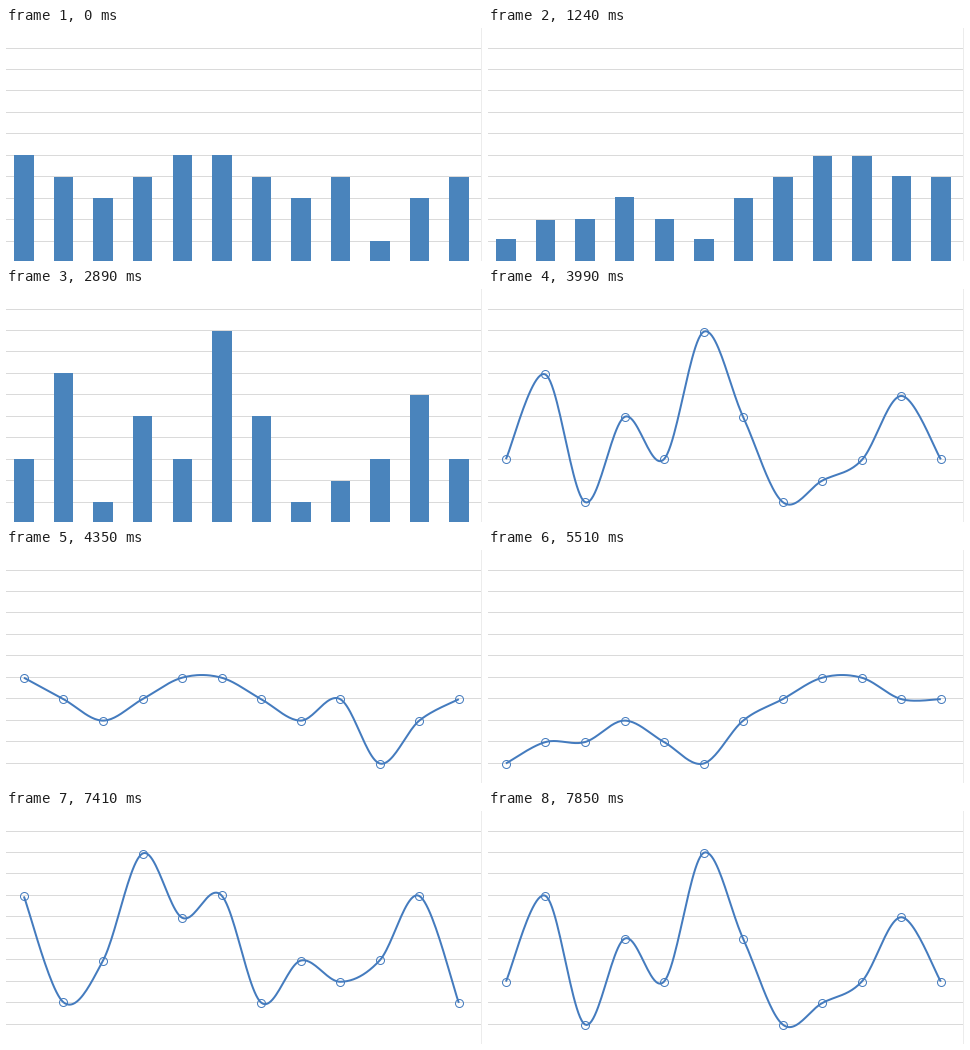
Write a matplotlib script that moves like this. It is 476 px wide and 233 px high and loops after 8.07 s.

```python
import numpy as np
import matplotlib.pyplot as plt
from matplotlib.animation import FuncAnimation
from matplotlib.patches import Rectangle

W, H, DPI = 476, 233, 100
LOOP, INTERVAL = 8070, 30
STEP = 40
SAMPLE = 20          # moment inside each frame that is drawn
LINE_START = 3150    # bars give way to the line chart

BAR, LINE, GRID, EDGE = "#4a84bc", "#447bbe", "#dadada", "#ececec"

A = np.array([5, 4, 3, 4, 5, 5, 4, 3, 4, 1, 3, 4], float)
B = np.array([1, 2, 2, 3, 2, 1, 3, 4, 5, 5, 4, 4], float)
C = np.array([7, 2, 4, 9, 6, 7, 2, 4, 3, 4, 7, 2], float)
D = np.array([3, 7, 1, 5, 3, 9, 5, 1, 2, 3, 6, 3], float)

# start time, number of steps, values before and after
MOVES = [
    (40, 9, A, B), (1240, 9, B, C), (2490, 11, C, D),
    (3990, 10, D, A), (5150, 10, A, B), (6260, 11, B, C), (7410, 12, C, D),
]

COUNT = len(A)
LEFTS = np.round(8.35 + 39.55 * np.arange(COUNT))
RIGHTS = np.round(27.75 + 39.55 * np.arange(COUNT))
XS = 17.9 + 39.54 * np.arange(COUNT)


def level(v):
    return 213.1 - 21.45 * (v - 1)


def ease(u):
    return 2 * u * u if u < 0.5 else 1 - 2 * (1 - u) ** 2


def values_at(t):
    vals = A
    for start, steps, old, new in MOVES:
        if t < start:
            break
        i = min((t - start) // STEP + 1, steps)
        vals = old + (new - old) * ease((i - 0.3) / (steps - 0.3))
    return vals


def smooth(p, n=24):
    """Cardinal spline through p, with gentler tangents at both ends."""
    m = np.gradient(p)
    m[[0, -1]] *= 0.5
    t = np.linspace(0, 1, n, endpoint=False)[:, None]
    h10, h01, h11 = t * (1 - t) ** 2, t * t * (3 - 2 * t), t * t * (t - 1)
    seg = (1 - h01) * p[:-1] + h10 * m[:-1] + h01 * p[1:] + h11 * m[1:]
    return np.append(seg.T.ravel(), p[-1])


def px(n):
    return n * 72 / DPI


fig = plt.figure(figsize=(W / DPI, H / DPI), dpi=DPI, facecolor="white")
ax = fig.add_axes([0, 0, 1, 1])
ax.set_xlim(0, W)
ax.set_ylim(H, 0)
ax.axis("off")


def block(x, y, w, h, color, z):
    return ax.add_patch(Rectangle((x, y), w, h, fc=color, lw=0,
                                  antialiased=False, zorder=z))


for v in range(1, 11):
    block(0, np.floor(level(v)), W - 1, 1, GRID, 1)
block(W - 1, 0, 1, H, EDGE, 1)

bars = [block(l, H, r - l, 0, BAR, 2) for l, r in zip(LEFTS, RIGHTS)]
curve_x = smooth(XS)
curve, = ax.plot([], [], color=LINE, lw=px(2), solid_joinstyle="round",
                 solid_capstyle="butt", zorder=3)
dots, = ax.plot([], [], "o", ms=px(8), mfc="none", mec=LINE, mew=px(1),
                zorder=4)


def draw(frame):
    t = frame * INTERVAL + SAMPLE
    vals = values_at(t)
    as_line = t >= LINE_START
    for bar, top in zip(bars, np.round(level(vals))):
        bar.set_visible(not as_line)
        bar.set_y(top)
        bar.set_height(H - top)
    ys = level(vals) + 0.4
    curve.set_data(curve_x, smooth(ys))
    dots.set_data(XS, ys)
    curve.set_visible(as_line)
    dots.set_visible(as_line)
    return [*bars, curve, dots]


anim = FuncAnimation(fig, draw, frames=LOOP // INTERVAL, interval=INTERVAL,
                     repeat=True, repeat_delay=0, blit=False)
plt.show()
```
